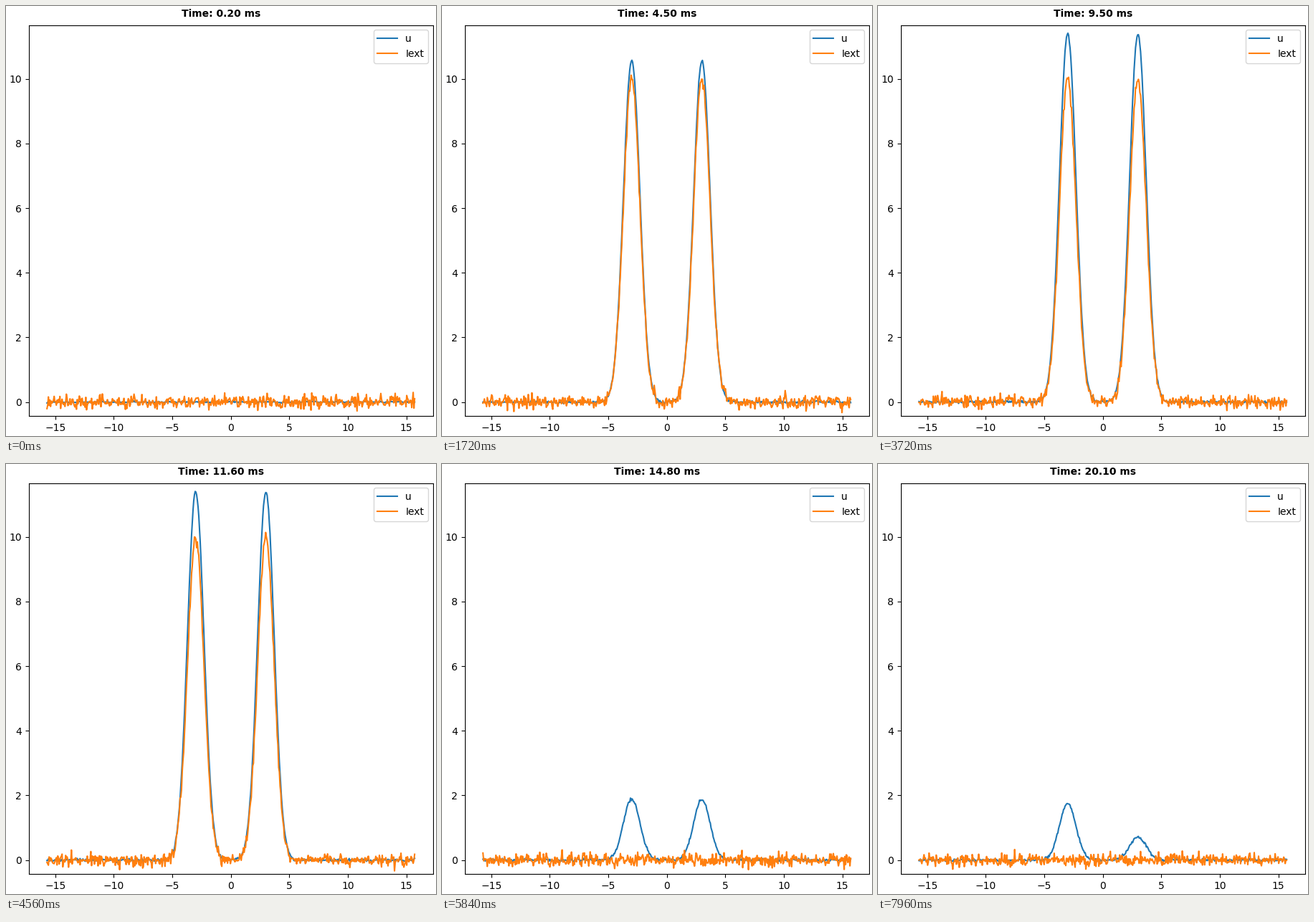
Recreate the animation shown at these times as a matplotlib script. Size 600 by 600 pixels, loop 8000 ms.

```python
import numpy as np
import matplotlib.pyplot as plt
from matplotlib.animation import FuncAnimation

FRAMES, INTERVAL = 200, 40
DT = 0.1                     # ms of model time per frame
FIRST = 2                    # model step shown first
STEPS = FIRST + FRAMES
ON, OFF = 20, 120            # stimulus is on for ON < step <= OFF

WIDTH, AMP = 0.5, 10.0       # bump width and stimulus height
GAIN, HALF = 2.82, 0.49      # recurrent gain and divisive constant
CENTER = 3.0
END_RATIO = 2.47             # left / right bump height at the end

x = np.linspace(-5 * np.pi, 5 * np.pi, 512)


def bump(center):
    return np.exp(-0.25 * ((x - center) / WIDTH) ** 2)


def is_on(step):
    return ON < step <= OFF


def heights(bias):
    """Heights of two competing bumps; the left one has a slight advantage."""
    h = np.zeros((STEPS, 2))
    edge = np.array([1 + bias, 1 - bias])
    for n in range(1, STEPS):
        sq = h[n - 1] ** 2
        drive = GAIN * edge * sq / (HALF + sq.sum())
        stim = AMP if is_on(n) else 0.0
        h[n] = h[n - 1] + DT * (drive + stim - h[n - 1])
    return h


def find_bias(lo=0.0, hi=0.05):
    for _ in range(30):
        mid = (lo + hi) / 2
        left, right = heights(mid)[-1]
        if left > END_RATIO * right:
            hi = mid
        else:
            lo = mid
    return lo


left, right = bump(-CENTER), bump(CENTER)
noise = np.random.default_rng(7).normal(0, 0.1, (STEPS, x.size))
smooth = np.zeros_like(noise)
for n in range(1, STEPS):
    smooth[n] = (1 - DT) * smooth[n - 1] + DT * noise[n]

h = heights(find_bias())
u = h[:, :1] * left + h[:, 1:] * right + smooth
stim_on = np.array([[is_on(n)] for n in range(STEPS)])
current = AMP * stim_on * (left + right) + noise

fig, ax = plt.subplots(figsize=(6, 6), dpi=100, layout="constrained")
u_line, = ax.plot(x, u[FIRST], label="u")
i_line, = ax.plot(x, current[FIRST], label="Iext")
ax.set_xlim(-5.5 * np.pi, 5.5 * np.pi)
ax.set_ylim(-0.4326, 11.6695)
ax.legend(loc="upper right")
title = fig.suptitle("Time: 0.20 ms", fontsize=10, fontweight="bold")

# lay out once, then keep the axes fixed
fig.canvas.draw()
fig.set_layout_engine("none")


def update(i):
    n = FIRST + i
    u_line.set_ydata(u[n])
    i_line.set_ydata(current[n])
    title.set_text(f"Time: {n * DT:.2f} ms")
    return u_line, i_line, title


anim = FuncAnimation(fig, update, frames=FRAMES, interval=INTERVAL,
                     repeat=True, repeat_delay=0)
plt.show()
```
